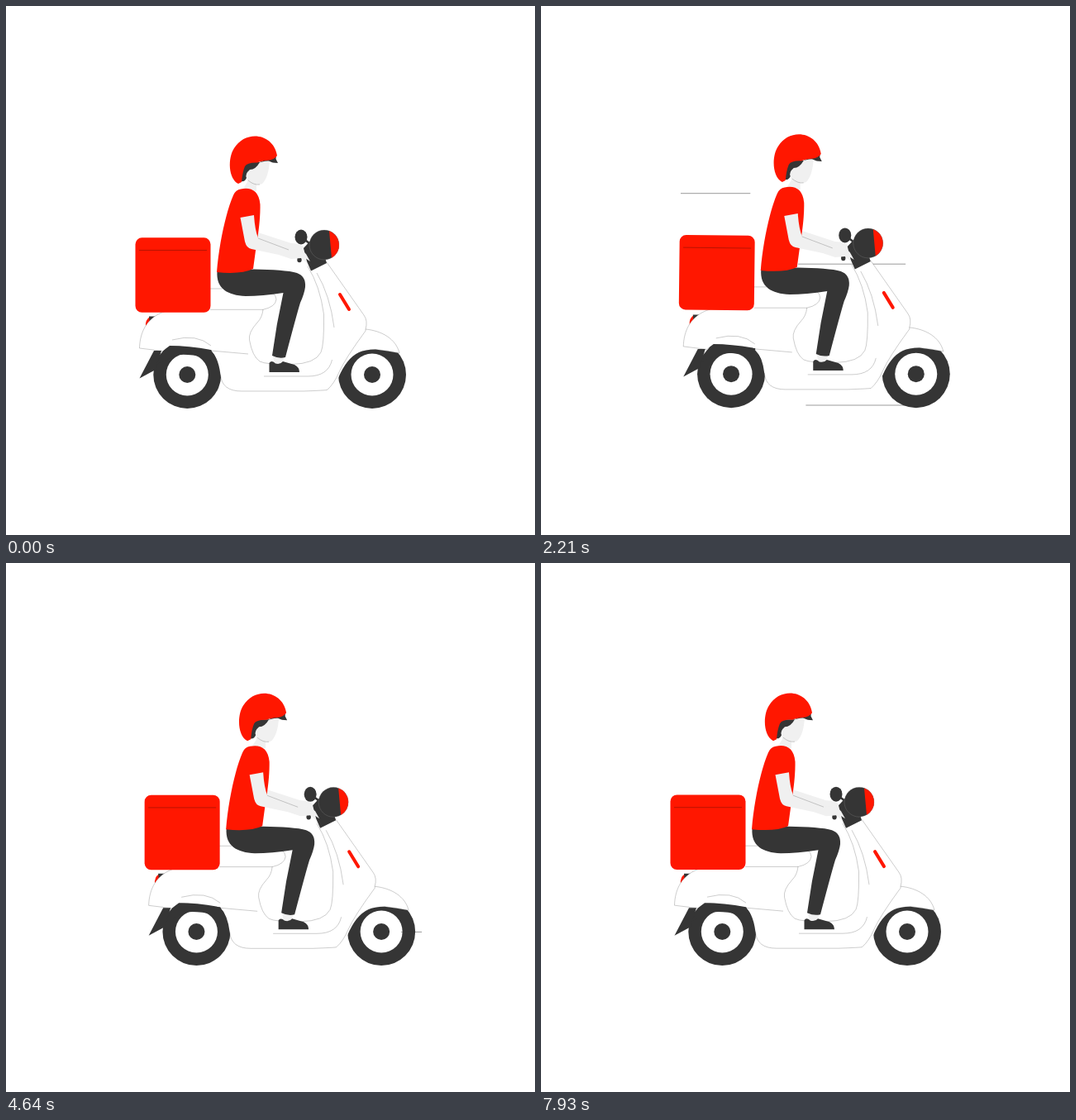
An HTML page for the animation above (8 s loop, 640 by 640 pixels).

```html
<!DOCTYPE html>
<html lang="en">
<head>
<meta charset="utf-8">
<title>Scooter delivery</title>
<style>
html, body { margin: 0; width: 100%; height: 100%; overflow: hidden; background: #fff; }
svg { display: block; width: 100vw; height: 100vh; }
.dark { fill: #353535; }
.red { fill: #ff1700; }
.skin { fill: #f0f0f0; }
.shell { fill: #fff; }
.thin { fill: none; stroke: #353535; stroke-width: .25; stroke-linejoin: round; }
#wind path { fill: none; stroke: #353535; stroke-width: .5; }
</style>
</head>
<body>
<svg viewBox="0 0 640 640">
  <defs>
    <g id="wheel">
      <circle class="dark" r="41"/>
      <circle class="shell" r="25.5"/>
      <circle class="dark" r="10"/>
    </g>
  </defs>
  <g id="ride">
    <use href="#wheel" x="219.3" y="446"/>
    <use href="#wheel" x="443" y="446"/>
  </g>
  <g id="wind"></g>
  <g id="top">
    <g id="body">
      <!-- mudguard and tail light -->
      <path class="dark" d="M161.500 450.500L179 417H188L181 440Z"/>
      <path class="dark" d="M196 410L250 416L239 427Q234 422.500 220 422Q208 421 203 424L181 434Z"/>
      <path class="red" d="M169 388Q168 380 174 376L177 379Z"/>
      <path class="dark" d="M173 375.500H186L174 385Z"/>

      <!-- scooter shell -->
      <path class="shell" d="M161.500 414C162 395 170 376 194 369Q202 367 247 367V341H310Q327 344 327 353Q327 363 311 367L294 405L340 434L384 405L365 315L388 310L433 374Q438 381 435 391L403 436L387 465.500H285C265 466 261 457 259.500 446Q257 426 248 416Q221 411 198 411L190 417Z"/>
      <path class="shell" d="M435 391C455 393 472 403 476 420Q462 417 447 415.500Q434 415.500 427 419Q412 426 402 450L390 440Z"/>
      <g class="thin">
        <path d="M247 342H262M247 367.300H311Q326 364 327 355Q327 350 322 347"/>
        <path d="M194 369C170 376 162 395 161.500 414L190 417.500Q198 411 204 411.500L248 417L293 421"/>
        <path d="M201 404Q231 396 248 411"/>
        <path d="M311 367Q310 377 304 383Q293 395 294.500 404Q298 424 307 430Q315 434 345 433.500Q374 433 381 419Q385 410 384.500 373Q380 339 365 315"/>
        <path d="M259.500 446Q261 466 285 466H360Q387 465 388.500 464.500Q397 457 403 443Q410 427 435 393V391Q438 381 433 374L388 310"/>
        <path d="M376 323Q392 350 397 389M312 448H365Q390 448 394.500 428"/>
        <path d="M435 391C455 393 472 403 476 420Q462 417 447 415.500Q424 415 404 447"/>
      </g>
      <path d="M404 349L415 367" stroke="#ff1700" stroke-width="4" stroke-linecap="round"/>

      <!-- handlebar -->
      <path class="skin" d="M305 274L345 287Q358 287 366 296L360 302L304 285Z"/>
      <path class="dark" d="M371 281L360 293L364 309L369 320.500L388 311L384 298Z"/>
      <path d="M359 281L371 290" stroke="#353535" stroke-width="2.500"/>
      <ellipse class="dark" cx="357" cy="279.500" rx="7.500" ry="9"/>
      <circle class="dark" cx="385" cy="289" r="18"/>
      <path class="red" d="M391 272A18 18 0 0 1 394 304.700Z"/>
      <circle class="thin" cx="385" cy="289" r="18" style="stroke:#999"/>
      <ellipse class="dark" cx="355" cy="307" rx="2.700" ry="3.300"/>

      <!-- rider -->
      <path class="skin" d="M323 424H337L333 434H325Z"/>
      <path class="dark" d="M318.500 443V432Q321 428 326 432.500Q332 434 335 430L349 434Q355 437 355 443Z"/>
      <path class="dark" d="M255.500 321L300 318.500C322 319 343 320 352 323Q363 327 362 340Q361 348 356 359Q352 372 338 425Q330 427 322 423Q327 385 335.500 347Q310 351 290 351C268 350 254 342 255.500 321Z"/>
      <path class="skin" d="M291 202L306 189L319 186Q318 207 310 215Q306 217 303 215.500V224H285L292 213Z"/>
      <path class="thin" d="M293 211Q300 217 307 216"/>
      <path class="dark" d="M287 189H307Q302 198 295 198Q289 203 291 208Q289 213 284 212Z"/>
      <path class="dark" d="M303 191Q314 185 327 180L326.500 185L329 190Q322 190 318 187.500Q311 187 303 191Z"/>
      <path class="red" d="M281 215C269 209 268 184 276 172C290 149 324 154 328 181Q325 186 316 186.800Q307 188 304 189.500Q292 189 289 194Q286 201 285 213Z"/>
      <path class="red" d="M284 221.500C296 219 306 223 307.500 240C308 260 304 283 302 296L299 318Q284 325 255 322C258 285 267 247 275 229Q278 222 284 221.500Z"/>
      <path class="skin" d="M283.500 256L300 253Q301 270 305 281L343 294Q357 293 363 300L368 309L362 305L364 311L357 305L345 306L330 301L297 294Q291 293 289 285Z"/>
      <path class="thin" d="M305 281L342 295"/>
    </g>
    <g id="box">
      <rect class="red" x="156.500" y="280.300" width="91" height="90.500" rx="8"/>
      <path d="M161 295.500H243" stroke="#8a1206" stroke-width=".6"/>
    </g>
  </g>
</svg>
<script>
const LOOP = 8000, SPEED = .66, RIGHT = 523;
const get = id => document.getElementById(id);

// Speed lines: height, length, left and right limits, times of entry
const winds = [
  [226.7, 123, 169, 523, [281, 1616, 3550, 6880]],
  [312.2, 130, 113, 519, [584, 1890, 6150]],
  [483, 127, 113, 466, [584, 1904, 2828, 5906]],
  [446.4, 25, 113, 523, [4573, 6271]]
].map(([y, len, min, max, starts]) => {
  const path = document.createElementNS("http://www.w3.org/2000/svg", "path");
  get("wind").append(path);
  return { path, y, len, min, max, starts };
});

const clamp = x => Math.min(1, Math.max(0, x));
const smooth = x => x * x * (3 - 2 * x);
const cubic = x => x < .5 ? 4 * x ** 3 : 1 - 4 * (1 - x) ** 3;

// A bump lifts the scooter, the suspension sinks and settles.
function bounce(p) {
  if (p < .13) return -2.3 * smooth(p / .13);
  if (p < .4) return -2.3 + 3.3 * smooth((p - .13) / .27);
  return 1 - clamp((p - .6) / .4) ** 2;
}

function lineAt({ y, len, min, max, starts }, t) {
  return starts.map(start => {
    const tip = RIGHT - (t - start) * SPEED;
    const a = Math.max(min, tip), b = Math.min(max, tip + len);
    return t >= start && b > a ? `M${a} ${y}H${b}` : "";
  }).join("");
}

function draw(now) {
  const t = now % LOOP, p = t % 2000 / 2000;
  const x = 11.6 * (cubic(clamp(t / 3000)) - cubic(clamp((t - 4000) / 3000)));
  const y = bounce(p);
  const hop = p < .32 ? Math.sin(Math.PI * p / .32) : 0;
  const tilt = p < .32 ? .75 * Math.sin(2 * Math.PI * p / .32) : 0;
  get("ride").setAttribute("transform", `translate(${x} ${-hop})`);
  get("top").setAttribute("transform", `translate(${x} ${y})`);
  get("box").setAttribute("transform", `translate(0 ${y * .4}) rotate(${tilt} 202 325)`);
  winds.forEach(w => w.path.setAttribute("d", lineAt(w, t)));
}

const begin = performance.now();
function tick() {
  draw(performance.now() - begin);
  requestAnimationFrame(tick);
}
draw(0);
requestAnimationFrame(tick);
</script>
</body>
</html>
```
